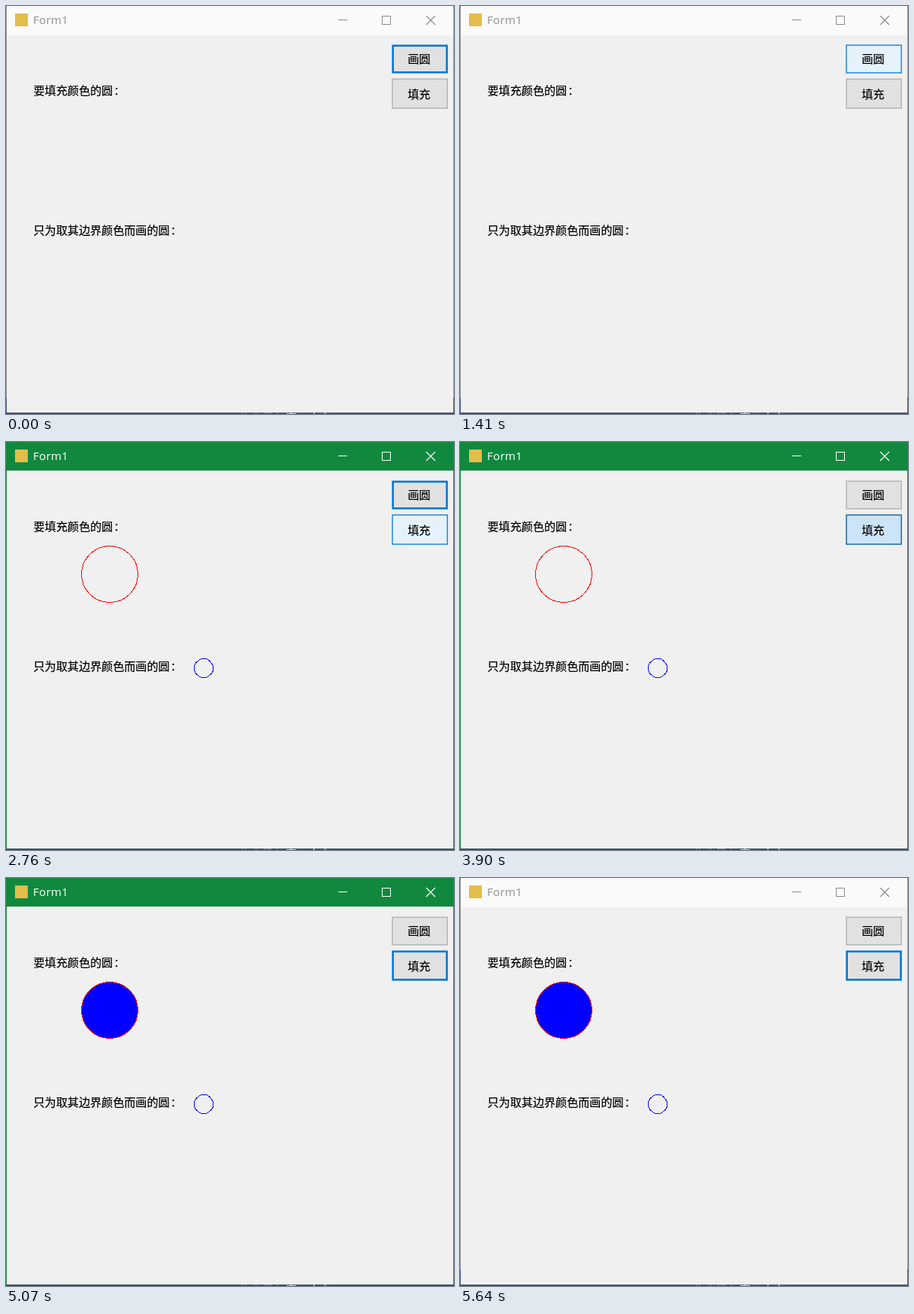
Write an HTML page that moves like this. It is 596 px wide and 543 px high and loops after 5.73 s.

```html
<!DOCTYPE html>
<html lang="zh-CN">
<head>
<meta charset="utf-8">
<title>Form1</title>
<style>
html, body { margin: 0; width: 100%; height: 100%; overflow: hidden; background: #f0f0f0; }
svg { display: block; width: 596px; height: 543px; }
text { font: 15.1px "Noto Sans CJK SC", "Noto Sans CJK", sans-serif; }
#caption { font-family: "Open Sans", "Noto Sans", sans-serif; letter-spacing: .25px; }
.label { stroke: #000; stroke-width: .2; }
.mid { text-anchor: middle; }
.crisp { shape-rendering: crispEdges; }
</style>
</head>
<body>
<svg viewBox="0 0 596 543">
  <rect width="596" height="543" fill="#f0f0f0"/>

  <!-- desktop below the window -->
  <g class="crisp">
    <rect y="541" width="596" height="2" fill="#3c4a78"/>
    <rect id="bottom" y="541" width="596" height="1"/>
  </g>
  <g fill="#b9c4e0">
    <text x="295" y="554" opacity=".6">一些背景色</text>
    <text x="372" y="553.5" fill="#d5ecf5">窗口文字</text>
  </g>

  <!-- title bar -->
  <rect id="bar" width="596"/>
  <g class="crisp">
    <rect id="left" width="1" height="541"/>
    <rect id="right" x="595" width="1" height="541"/>
    <g id="corners" fill="#46558c">
      <rect y="521" width="1" height="20"/>
      <rect x="595" y="521" width="1" height="20"/>
    </g>
  </g>
  <rect x="12" y="10" width="17" height="17" fill="#e3bd4a"/>
  <text id="caption" x="36" y="24">Form1</text>
  <g id="controls" fill="none">
    <path class="crisp" d="M442 18.5H454M500.5 13.5H511.5V24.5H500.5Z"/>
    <path d="M559 13L571 25M571 13L559 25" stroke-width="1.2"/>
  </g>

  <g class="label">
    <text x="36.5" y="117.5">要填充颜色的圆<tspan dx="1">：</tspan></text>
    <text x="36.5" y="304">只为取其边界颜色而画的圆<tspan dx="1">：</tspan></text>
  </g>

  <g id="circles" class="crisp" fill="none">
    <circle id="big" cx="138" cy="176" r="37.5" stroke="#f00"/>
    <path d="M259.5 288.5H266.5Q270 289 275.5 297.5V304.5Q274 309 266.5 313.5H259.5Q253 310 250.5 304.5V297.5Q253 292 259.5 288.5Z" stroke="#00f"/>
  </g>

  <rect id="draw"/>
  <text class="label mid" x="549.5" y="76">画圆</text>
  <rect id="fill"/>
  <text class="label mid" x="549.5" y="122.7">填充</text>
</svg>
<script>
const LOOP = 5730;
const $ = id => document.getElementById(id);
const set = (id, attrs) => {
  for (const k in attrs) $(id).setAttribute(k, attrs[k]);
};

// fill, border colour, border width
const looks = {
  normal: ['#e1e1e1', '#adadad', 1.3],
  focus: ['#e1e1e1', '#0078d7', 2.6],
  hover: ['#e5f1fb', '#0078d7', 1.3],
  press: ['#cce4f7', '#005499', 1.3]
};

// Each step changes only what it names.
const steps = [
  [0, { draw: 'focus', fill: 'normal', active: false, circles: false, filled: false }],
  [450, { draw: 'hover' }],
  [750, { draw: 'focus' }],
  [1410, { draw: 'hover' }],
  [1920, { draw: 'press', active: true }],
  [2040, { draw: 'hover', circles: true }],
  [2730, { draw: 'focus' }],
  [2760, { fill: 'hover' }],
  [3900, { draw: 'normal', fill: 'press' }],
  [4020, { filled: true }],
  [4050, { fill: 'hover' }],
  [5070, { fill: 'focus' }],
  [5100, { draw: 'hover' }],
  [5160, { draw: 'normal' }],
  [5640, { active: false }]
];

function button(id, top, bottom, look) {
  const [fill, stroke, w] = looks[look];
  const inset = w / 2;
  set(id, {
    x: 513.4 + inset, y: top + inset,
    width: 74.4 - w, height: bottom - top - w,
    fill, stroke, 'stroke-width': w
  });
}

function render(t) {
  const s = {};
  for (const [at, change] of steps) if (t >= at) Object.assign(s, change);

  const on = s.active;
  set('bar', { height: on ? 38 : 39, fill: on ? '#10893e' : '#fafafa' });
  set('left', { fill: on ? '#10893e' : '#8e8e8e' });
  set('right', { fill: on ? '#3d7456' : '#9a9a9a' });
  set('bottom', { fill: on ? '#3a5365' : '#555c79' });
  set('corners', { visibility: on ? 'hidden' : 'visible' });
  set('caption', { fill: on ? '#fff' : '#8f8f8f' });
  set('controls', { stroke: on ? '#fff' : '#8c8c8c' });

  set('circles', { visibility: s.circles ? 'visible' : 'hidden' });
  set('big', { fill: s.filled ? '#00f' : 'none' });
  button('draw', 51.5, 89.6, s.draw);
  button('fill', 96.5, 136.7, s.fill);
}

const start = performance.now();
function tick() {
  render((performance.now() - start) % LOOP);
  requestAnimationFrame(tick);
}
tick();
</script>
</body>
</html>
```
